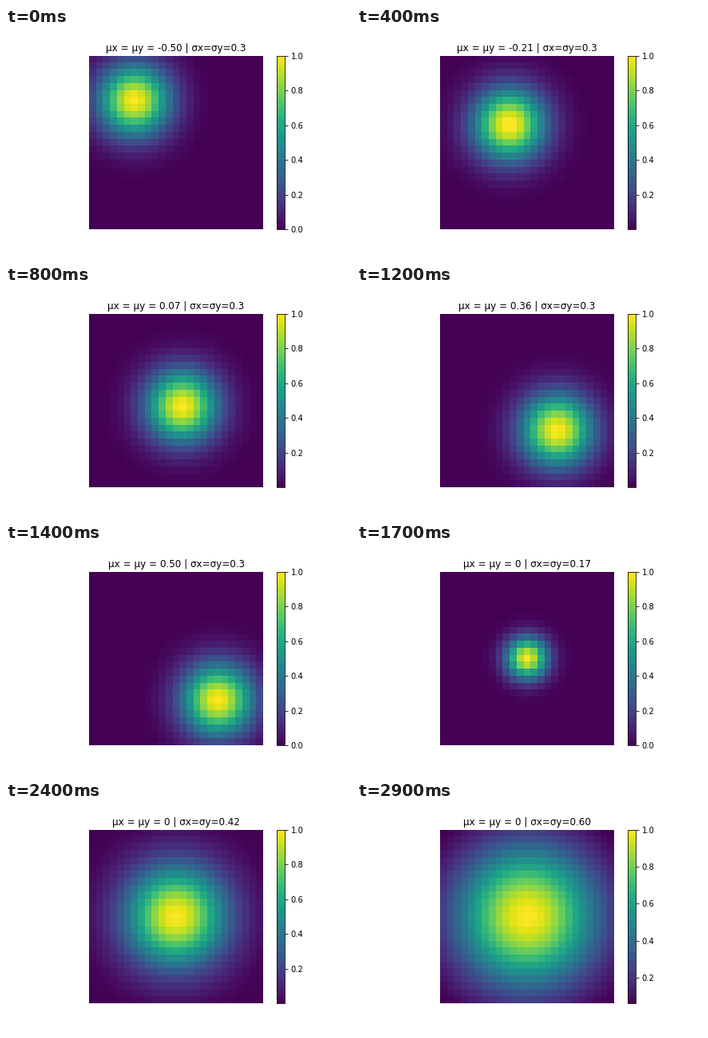
Write a matplotlib script that moves like this. It is 432 by 288 pixels and loops after 3 s.

```python
import numpy as np
import matplotlib.pyplot as plt
from matplotlib.animation import FuncAnimation

plt.rcParams["font.family"] = "DejaVu Sans"

STEPS = 15
MEANS = np.linspace(-0.5, 0.5, STEPS)
SIGMAS = np.linspace(0.1, 0.6, STEPS)
X, Y = np.meshgrid(np.linspace(-1, 1, 25), np.linspace(-1, 1, 25))


def gaussian(mean, sigma):
    """Isotropic 2D bell scaled to a peak of 1."""
    z = np.exp(-((X - mean) ** 2 + (Y - mean) ** 2) / (2 * sigma**2))
    return z / z.max()


def state(i):
    """Slide the mean first, then widen the bell at the centre."""
    if i < STEPS:
        mean = MEANS[i]
        return gaussian(mean, 0.3), f"μx = μy = {mean:.2f} | σx=σy=0.3"
    sigma = SIGMAS[i - STEPS]
    return gaussian(0, sigma), f"μx = μy = 0 | σx=σy={sigma:.2f}"


fig, ax = plt.subplots(figsize=(6, 4), dpi=72)
fig.subplots_adjust(left=0.125, right=0.9, bottom=0.125, top=0.88)
ax.axis("off")

data, label = state(0)
image = ax.imshow(data, cmap="viridis", interpolation="nearest")
title = ax.set_title(label, fontsize=12)
fig.colorbar(image, ax=ax)


def update(i):
    z, text = state(i)
    image.set_data(z)
    image.set_clim(z.min(), z.max())
    title.set_text(text)
    return image, title


anim = FuncAnimation(fig, update, frames=2 * STEPS, interval=100,
                     repeat=True, repeat_delay=0, blit=False)
plt.show()
```
